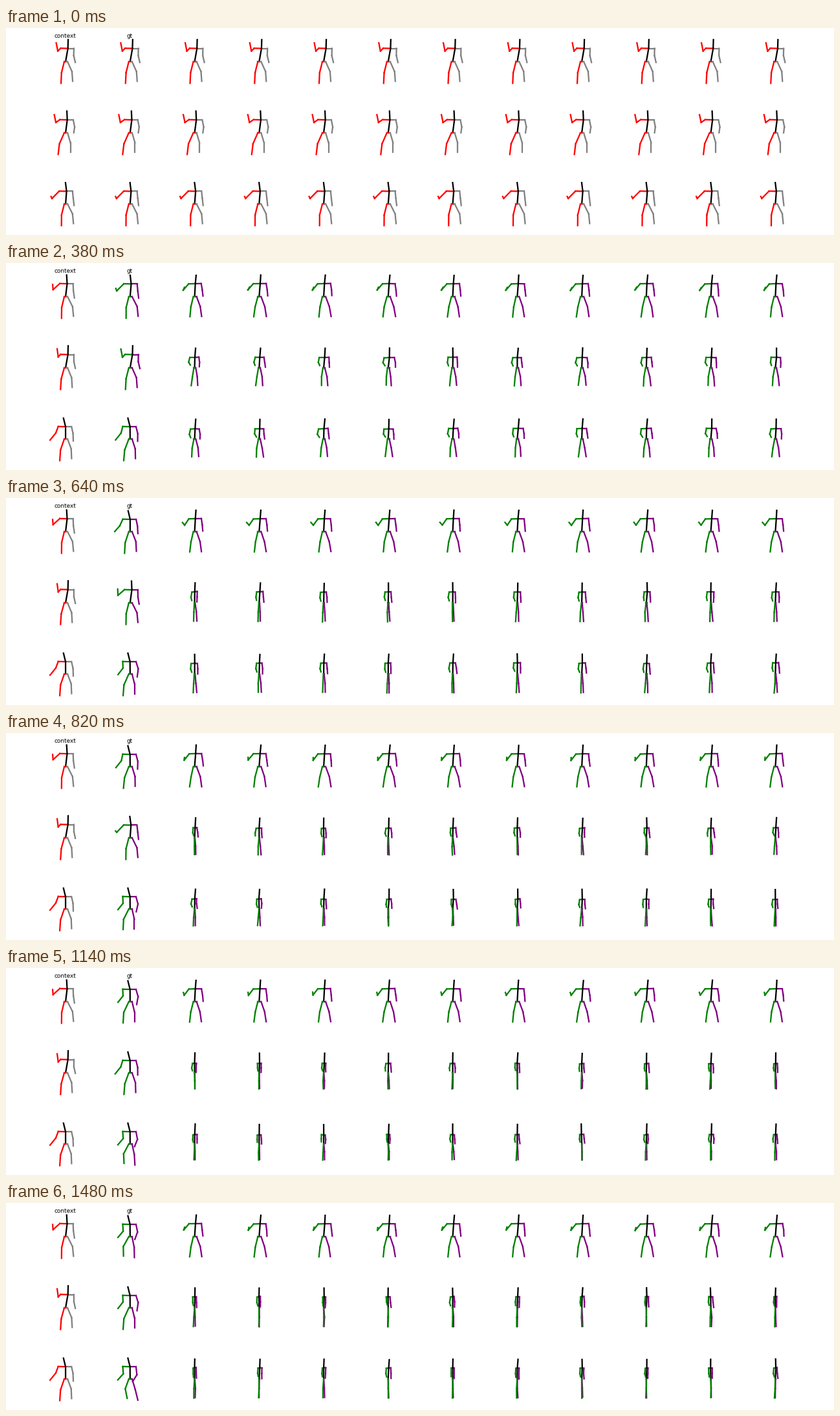
These frames come from a looping animation (1280 px wide and 320 px high, 1.5 s). A matplotlib script:

```python
import numpy as np
import matplotlib.pyplot as plt
from matplotlib.animation import FuncAnimation
from matplotlib.collections import LineCollection

W, H, DPI = 1280, 320, 100
FRAMES, INTERVAL = 75, 20
HISTORY = 15                 # observed frames before prediction starts
COLS, ROWS = 12, 3
SHIFT = (20, 0, 40)          # where each row enters the shared motion

# Joints are complex numbers: pixels from the pelvis, imaginary part down.
(PELVIS, NECK, L_SHOULDER, L_ELBOW, L_WRIST, R_SHOULDER, R_ELBOW, R_WRIST,
 L_HIP, L_KNEE, L_ANKLE, R_HIP, R_KNEE, R_ANKLE, HEAD) = range(15)
LEGS = slice(L_HIP, R_ANKLE + 1)
# The right limbs come first so that the left ones are drawn over them.
PARENT = {NECK: PELVIS,
          R_SHOULDER: NECK, R_ELBOW: R_SHOULDER, R_WRIST: R_ELBOW,
          L_SHOULDER: NECK, L_ELBOW: L_SHOULDER, L_WRIST: L_ELBOW,
          R_HIP: PELVIS, R_KNEE: R_HIP, R_ANKLE: R_KNEE,
          L_HIP: PELVIS, L_KNEE: L_HIP, L_ANKLE: L_KNEE,
          HEAD: NECK}
LEFT = {L_SHOULDER, L_ELBOW, L_WRIST, L_HIP, L_KNEE, L_ANKLE}
MIDDLE = {NECK, HEAD}


def smooth(t, start, end):
    u = np.clip((t - start) / (end - start), 0, 1)
    return u * u * (3 - 2 * u)


def leg(t, hip, thigh, shin, knee_y, foot_y, reach):
    """Knee and ankle from sideways steps; reach stretches the leg."""
    beats = (0, 16, 38, 64, 92, 114)
    knee_x = hip + np.interp(t, beats, thigh)
    foot_x = knee_x + np.interp(t, beats, shin)
    return knee_x + 1j * knee_y * reach, foot_x + 1j * foot_y * reach


def real_motion():
    """Raise the left arm, stretch it out, lower it and shift the weight."""
    t = np.arange(FRAMES + max(SHIFT))
    p = np.zeros((len(t), 15), complex)

    lean = 2 + 2 * smooth(t, 0, 14) - 7.4 * smooth(t, 20, 57)
    p[:, HEAD] = lean - 1j * (33 + .25 * lean)
    p[:, NECK] = neck = 1.6 + .5 * lean - 1j * (19.6 + .2 * lean)
    p[:, L_SHOULDER] = neck - 11.3 - .3j
    p[:, R_SHOULDER] = neck + 9.2

    beats = (0, 11, 20, 31, 40, 54, 72, 114)
    p[:, L_ELBOW] = np.interp(t, beats, (
        -15-16j, -11-17j, -12-16.3j, -18.5-12j,
        -21-8.5j, -15.2-9j, -11-9j, -10.5-8j))
    p[:, L_WRIST] = np.interp(t, beats, (
        -17.5-28j, -12.3-29.5j, -14.5-29j, -18.8-22.5j,
        -22.5-11.5j, -24+1.8j, -18.7+1j, -19+1.5j))
    beats = (0, 16, 52, 72, 114)
    p[:, R_ELBOW] = np.interp(
        t, beats, (14-9j, 12.7-9.5j, 11.4-8.5j, 12.6-8j, 10.5-6.5j))
    p[:, R_WRIST] = np.interp(
        t, beats, (12.7, 15.4+1j, 12+3j, 11+4.5j, 4+4j))

    p[:, L_HIP], p[:, R_HIP] = -2, 3
    p[:, L_KNEE], p[:, L_ANKLE] = leg(
        t, -2, (-7.5, -4.3, -4, -7, -8.8, -5.5), (-2, -1, 0, -1.8, 0, 3),
        17, 33.4, 1 - .1 * smooth(t, 72, 90))
    p[:, R_KNEE], p[:, R_ANKLE] = leg(
        t, 3, (4.5, 6.6, 8, 4.2, 3.1, 5), (0, 1, 1.6, 0, 0, 4),
        15.3, 30.3, 1 + .08 * smooth(t, 64, 104))
    return p


STAND = np.array([
    0, 1.3-20j, -9-19.7j, -11-10j, -8-4j, 10.5-20j, 11.9-10.2j, 12.7-1j,
    -2, -6+16j, -7.8+31.2j, 3, 8.4+15.5j, 10.9+30.9j, 2.3-33j])
N = np.arange(FRAMES)


def steady():
    """Standing still while the left forearm swings in and out."""
    p = np.tile(STAND, (FRAMES, 1))
    swing = np.cos(2 * np.pi * N / 32)
    p[:, L_ELBOW] = -16.6 + .9 * swing - 10j
    p[:, L_WRIST] = -17 - 2.3 * swing - 14.3j
    return p


def collapse():
    """The standing pose narrows to a line while its height breathes."""
    narrow = .25 + .5 * np.exp(-(N - 19) / 16)
    tall = .77 - .08 * np.cos(2 * np.pi * (N - 51) / 46)
    x = STAND.real * narrow[:, None]
    y = STAND.imag * tall[:, None]
    x[:, LEGS] *= narrow[:, None]
    y[:, LEGS] *= 1.1
    y[:, HEAD] = -30.3
    return x + 1j * y


def drift(rng, size):
    """Slow random wander that adds up along each limb."""
    knots = np.arange(0, FRAMES + 5, 5)
    out = np.zeros((FRAMES, 15), complex)
    for joint, parent in PARENT.items():
        if joint in (L_HIP, R_HIP):
            continue
        x, y = rng.uniform(-size, size, (2, len(knots)))
        out[:, joint] = out[:, parent] + np.interp(N, knots, x + .5j * y)
    return out


def build():
    """All joints as [frame, row, column, joint] in stage pixels."""
    rng = np.random.default_rng(7)
    motion = real_motion()
    fade = np.clip((N - HISTORY + 1) / 4, 0, 1)[:, None]
    out = np.zeros((FRAMES, ROWS, COLS, 15), complex)
    for r, shift in enumerate(SHIFT):
        real = motion[shift:shift + FRAMES]
        last = real[HISTORY - 1]
        out[:, r] = real[:, None]
        out[HISTORY:, r, 0] = last
        guess = collapse() if r else steady()
        for c in range(2, COLS):
            path = guess + drift(rng, 1 if r else .5)
            path = last + fade * (path - last)
            out[HISTORY:, r, c] = path[HISTORY:]
    out += 92.1 + 99.75 * np.arange(COLS)[:, None]
    out += 1j * (52 + 110 * np.arange(ROWS)[:, None, None])
    return out


def palette(left, right):
    return ["black" if j in MIDDLE else left if j in LEFT else right
            for j in PARENT]


JOINTS = build()
CHILDREN, PARENTS = list(PARENT), list(PARENT.values())
SEEN = palette("red", "gray")
GUESSED = palette("green", "purple")
BEFORE = SEEN * (ROWS * COLS)
AFTER = (SEEN + GUESSED * (COLS - 1)) * ROWS

fig = plt.figure(figsize=(W / DPI, H / DPI), dpi=DPI, facecolor="white")
ax = fig.add_axes([0, 0, 1, 1])
ax.set(xlim=(0, W), ylim=(H, 0))
ax.axis("off")
for x, label in ((91, "context"), (191, "gt")):
    ax.text(x, 15, label, ha="center", va="baseline",
            family="DejaVu Sans", size=6.4)
bones = LineCollection([], linewidths=2.25 * 72 / DPI, capstyle="projecting")
ax.add_collection(bones, autolim=False)


def draw(n):
    p = JOINTS[n]
    ends = np.stack([p[..., PARENTS], p[..., CHILDREN]], axis=-1)
    segments = np.stack([ends.real, ends.imag], axis=-1)
    bones.set_segments(segments.reshape(-1, 2, 2))
    bones.set_color(BEFORE if n < HISTORY else AFTER)
    return [bones]


anim = FuncAnimation(fig, draw, frames=FRAMES, interval=INTERVAL,
                     repeat=True, repeat_delay=0)
plt.show()
```
